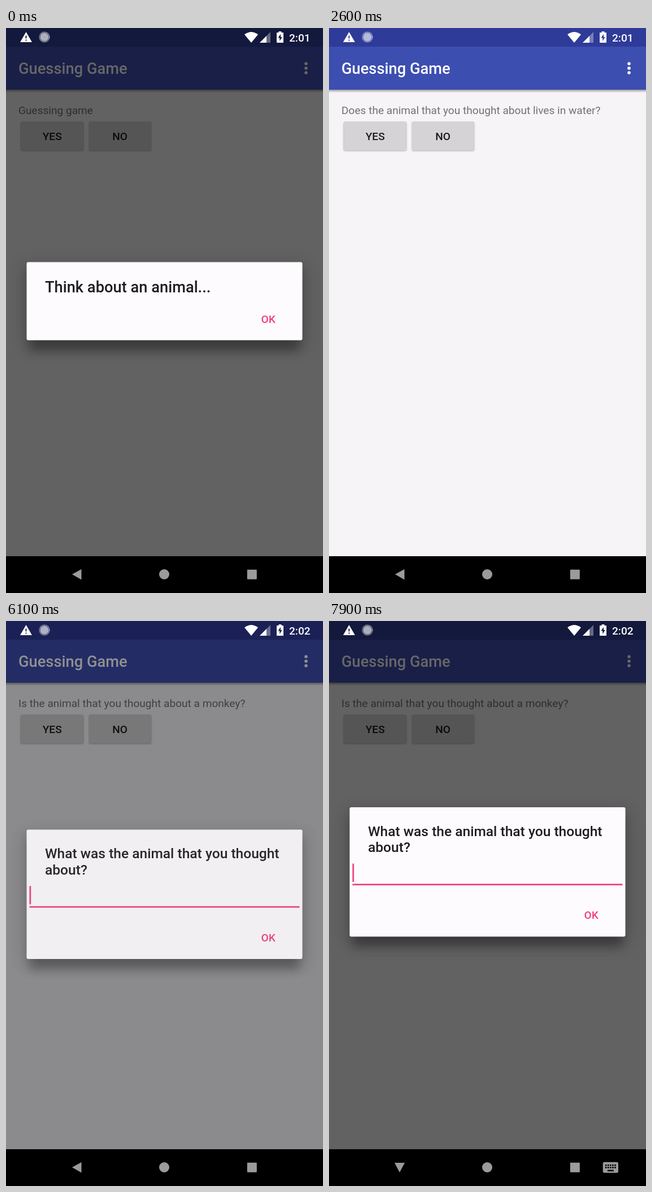
These frames come from a looping animation (561 by 998 pixels, 8000 ms). An HTML page:

```html
<!DOCTYPE html>
<html lang="en">
<head>
<meta charset="utf-8">
<title>Guessing Game</title>
<style>
  html, body { margin: 0; width: 100%; height: 100%; overflow: hidden; background: #000; }
  svg { display: block; width: 561px; height: 998px; font: 19.1px Roboto, sans-serif; }
  .medium { font-weight: 500; }
  .title { font-weight: 500; font-size: 27.27px; }
  .prompt { font-weight: 500; font-size: 24.55px; }
  .accent { fill: #f23d7c; }
  .button { fill: #d5d3d6; }
  .thin { filter: blur(1.5px); opacity: .3; }
  .near { filter: blur(9px); opacity: .3; }
  .far { filter: blur(15px); opacity: .16; }
</style>
</head>
<body>
<svg viewBox="0 0 561 998">
  <g id="app">
    <rect width="561" height="933" fill="#f6f4f7"/>
    <rect class="thin" x="-5" y="100" width="571" height="12"/>
    <rect y="32" width="561" height="77" fill="#3d4eb1"/>
    <rect width="561" height="33" fill="#2f3b98"/>
    <text class="title" x="22" y="81" fill="#fff">Guessing Game</text>
    <g fill="#fff">
      <circle cx="531" cy="63" r="2.8"/><circle cx="531" cy="71" r="2.8"/><circle cx="531" cy="79" r="2.8"/>
    </g>
    <text id="question" x="22" y="152" fill="#727173"></text>
    <rect class="thin" x="26" y="167" width="111" height="50" rx="2"/>
    <rect class="thin" x="147" y="167" width="110" height="50" rx="2"/>
    <rect class="button" x="26.5" y="165" width="110" height="51" rx="2"/>
    <rect class="button" x="147" y="165" width="110" height="51" rx="2"/>
    <rect id="noPress" x="147" y="165" width="110" height="51" rx="2"/>
    <g class="medium" text-anchor="middle" fill="#1c1b1d">
      <text x="81.7" y="197.5">YES</text><text x="201.5" y="197.5">NO</text>
    </g>
  </g>

  <rect id="dim" width="561" height="933"/>

  <g id="think">
    <rect class="far" x="30" y="418" width="501" height="148"/>
    <rect class="near" x="42" y="428" width="477" height="142"/>
    <rect x="36.5" y="413.5" width="488" height="138" rx="3" fill="#fdfbfe"/>
    <rect id="okPress" x="428" y="489" width="76" height="50" rx="3" opacity=".015"/>
    <text class="title" x="69" y="467" fill="#1e1d1f">Think about an animal...</text>
    <text class="medium accent" x="451.5" y="520.5">OK</text>
  </g>

  <g id="ask">
    <rect class="far" x="30" y="373" width="501" height="238"/>
    <rect class="near" x="42" y="383" width="477" height="232"/>
    <rect x="36.5" y="368.5" width="488" height="228.5" rx="3" fill="#fdfbfe"/>
    <g class="prompt" fill="#1e1d1f">
      <text x="69" y="419">What was the animal that you thought</text>
      <text x="69" y="447.5">about?</text>
    </g>
    <g class="accent">
      <rect id="caret" x="41.5" y="468" width="2.7" height="32.5"/>
      <rect x="41.5" y="503.7" width="478" height="2.7"/>
      <text class="medium" x="451.5" y="565.8">OK</text>
    </g>
  </g>

  <g id="status" fill="#fff" fill-rule="evenodd">
    <path d="M35.5 7L46 25H25ZM34.5 13.5V18.5H36.5V13.5ZM34.5 20.5V22.5H36.5V20.5Z"/>
    <circle cx="68" cy="16" r="7.5" opacity=".65"/>
    <circle cx="68" cy="16" r="8.7" fill="none" stroke="#fff" stroke-width="1.8" stroke-dasharray="1.3 1" opacity=".75"/>
    <path d="M422 11.5Q434 2.5 446 11.5L434 26Z"/>
    <path d="M468 7V26H449Z" opacity=".35"/>
    <path d="M461 14V26H449Z"/>
    <path d="M482.5 8V6H487.5V8H491V26H479V8ZM486 10.5L481.5 17.5H484.3V23L488.6 16H486Z"/>
    <text id="clock" class="medium" x="501" y="23.8"></text>
  </g>

  <g id="navigation" fill="#9b9b9b">
    <rect y="933" width="561" height="65" fill="#000"/>
    <path id="back"/>
    <circle cx="280" cy="965" r="9"/>
    <rect x="426.8" y="956.8" width="17" height="17" rx="1"/>
    <g id="keyboard" transform="translate(482 949) scale(1.36)">
      <rect x="2" y="5" width="20" height="14" rx="2"/>
      <path d="M5 9H19M5 12H19" stroke="#000" stroke-width="2" stroke-dasharray="2 1"/>
      <path d="M8 16H16" stroke="#000" stroke-width="2"/>
    </g>
  </g>
</svg>
<script>
const LOOP = 8000, STEP = 100, DIM = .595;
const el = id => document.getElementById(id);
const clamp = v => Math.min(1, Math.max(0, v));
const ramp = (t, from, to) => clamp((t - from) / (to - from));
const show = (id, on) => el(id).setAttribute('display', on ? 'inline' : 'none');
const opacity = (id, v) => el(id).setAttribute('opacity', v);
const press = (t, from, to) => Math.sin(Math.PI * ramp(t, from - STEP, to)) * .14;

function render(t) {
  const think = 1 - ramp(t, 2463, 2600);
  const asking = t >= 6100;
  const askDim = asking ? (t < 6300 ? .73 : 1) : 0;

  el('question').textContent =
    t < 2500 ? 'Guessing game' :
    t < 4700 ? 'Does the animal that you thought about lives in water?' :
    'Is the animal that you thought about a monkey?';
  el('clock').textContent = t < 5300 ? '2:01' : '2:02';

  opacity('noPress', press(t, 4600, 4900) + press(t, 5700, 5900));
  opacity('dim', DIM * Math.max(think, askDim));
  opacity('think', think);
  show('okPress', t >= 2300);

  opacity('ask', asking ? (t < 6300 ? .9 : 1) : 0);
  const lift = 1 - (1 - ramp(t, 7500, 7800)) ** 2;
  el('ask').setAttribute('transform', `translate(0 ${-39.5 * lift})`);
  show('caret', t < 7100 || t >= 7500);

  const typing = t >= 7500;
  show('keyboard', typing);
  el('back').setAttribute('d', typing ? 'M116 957H134L125 974Z' : 'M117 965L133.5 956V974.5Z');
}

function tick() {
  const t = performance.now() % LOOP;
  render(Math.floor(t / STEP) * STEP);
  requestAnimationFrame(tick);
}
tick();
</script>
</body>
</html>
```
